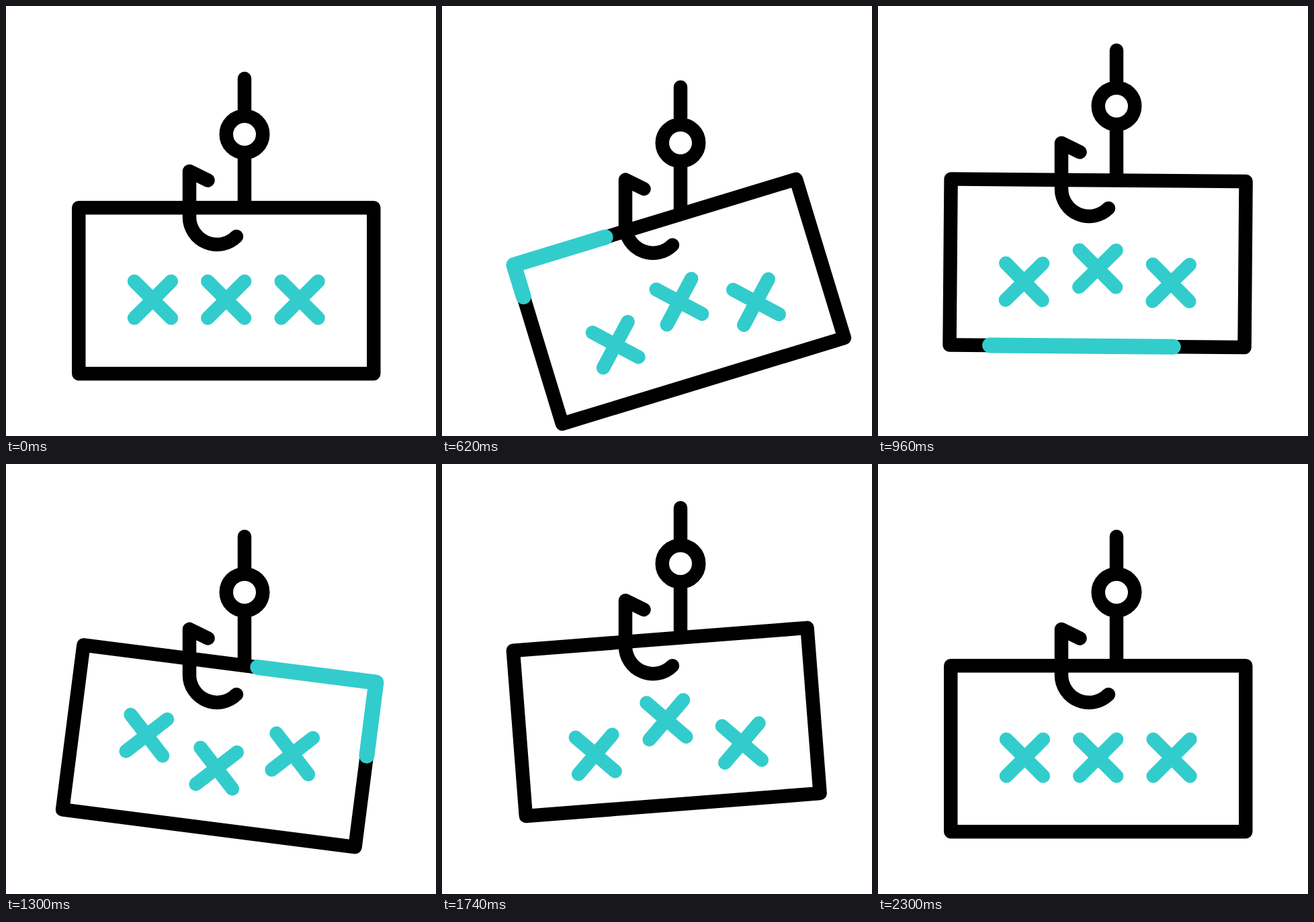
Write an HTML page that moves like this. It is 640 by 640 pixels and loops after 2400 ms.

```html
<!DOCTYPE html>
<html lang="en">
<head>
<meta charset="utf-8">
<title>Hooked password</title>
<style>
  html, body { margin: 0; width: 100%; height: 100%; overflow: hidden; background: #fff; }
  svg { display: block; width: 100%; height: 100%; }
  svg * { fill: none; stroke: #000; stroke-width: 20.5; stroke-linecap: round; stroke-linejoin: round; }
  .mark, #trace { stroke: #33cccc; }
  #trace { stroke-width: 23; }
</style>
</head>
<body>
<svg viewBox="0 0 640 640">
  <g class="hook">
    <path d="M355 108V154M355 219V292"/>
    <circle cx="355" cy="191" r="27.25"/>
  </g>
  <g id="card">
    <rect x="108.25" y="300.25" width="439" height="247"/>
    <path id="trace" pathLength="1" d="M273 300.25H108.25V547.25H547.25V300.25H273"/>
    <path class="mark" d="M191 409.7l54.8 54.8m0 -54.8l-54.8 54.8"/>
    <path class="mark" d="M300.3 409.7l54.8 54.8m0 -54.8l-54.8 54.8"/>
    <path class="mark" d="M409.7 409.7l54.8 54.8m0 -54.8l-54.8 54.8"/>
  </g>
  <g class="hook">
    <path d="M300.5 259.5L273 246V314A41 41 0 0 0 343 343"/>
  </g>
</svg>
<script>
  const LOOP = 2400, STEP = 20, BEAT = 400;

  const progress = (t, from, to) => Math.min(1, Math.max(0, (t - from) / (to - from)));
  const sine = u => (1 - Math.cos(Math.PI * u)) / 2;

  // Swings from rest through the turning points and back to rest, one per beat.
  function swing(t, start, ...turns) {
    let from = 0;
    return [...turns, 0].reduce((sum, to, i) => {
      const begin = start + i * BEAT;
      const part = (to - from) * sine(progress(t, begin, begin + BEAT));
      from = to;
      return sum + part;
    }, 0);
  }

  const lift = t => swing(t, 200, 13, -43.4, 7.3, -45.7);
  const outer = t => swing(t, 400, 36, -24.5, 36.5);
  const inner = t => swing(t, 400, -22.5, 27.3, -22.8);

  // The tilt's second swing is slower and its last one quicker than a beat.
  const tilt = t =>
    -17 * sine(progress(t, 200, 600)) +
    26.7 * sine(progress(t, 600, 1200)) +
    swing(t, 1200, -16.5, -7.8) * (t < 2000) +
    (t >= 2000) * (-7.8 - 1.9 * sine(progress(t, 2000, 2300)));

  const head = t => progress(t, 483, 1362);
  const tail = t => progress(t, 596, 1540) ** 1.12;

  const hooks = document.querySelectorAll('.hook');
  const marks = document.querySelectorAll('.mark');
  const card = document.getElementById('card');
  const trace = document.getElementById('trace');
  const shift = (el, y) => el.setAttribute('transform', `translate(0 ${y})`);

  function draw(t) {
    hooks.forEach(el => shift(el, lift(t)));
    card.setAttribute('transform',
      `translate(0 ${lift(t) * 0.97}) rotate(${tilt(t)} 353 341)`);
    marks.forEach((el, i) => shift(el, i === 1 ? inner(t) : outer(t)));

    const length = head(t) - tail(t);
    trace.style.display = length > 0 ? '' : 'none';
    trace.style.strokeDasharray = `${length} 3`;
    trace.style.strokeDashoffset = -tail(t);
  }

  const begin = performance.now();
  function tick() {
    const t = (performance.now() - begin) % LOOP;
    draw(Math.floor(t / STEP) * STEP);
    requestAnimationFrame(tick);
  }
  tick();
</script>
</body>
</html>
```
